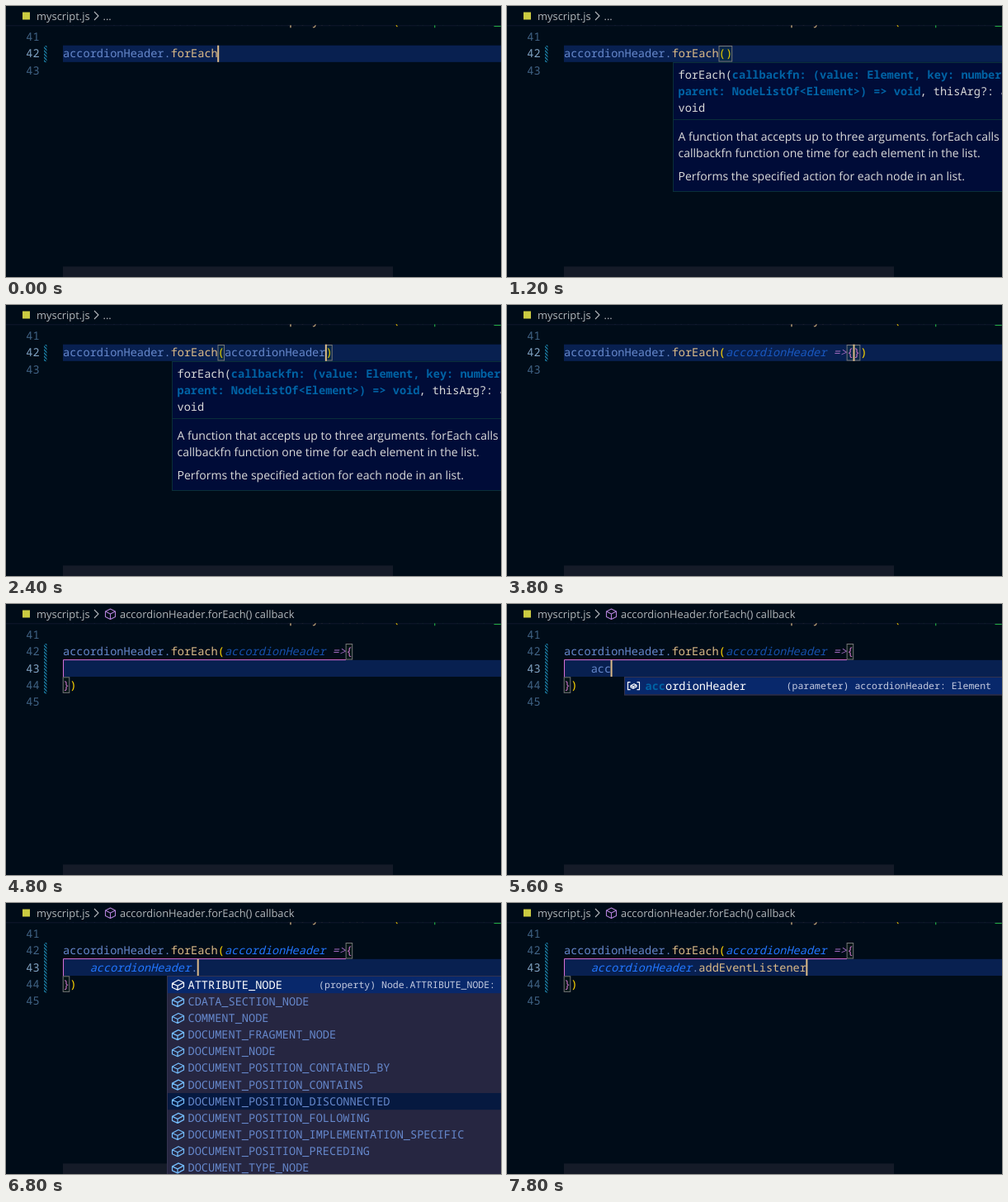
An HTML page that plays this animation: 600x328 px, repeating every 8000 ms.

```html
<!DOCTYPE html>
<html lang="en">
<head>
<meta charset="utf-8">
<title>Typing in a code editor</title>
<style>
  html, body { margin: 0; height: 100%; overflow: hidden; background: #000c18; }
  svg { display: block; width: 100vw; height: 100vh; }
  text { font: 13.61px "Noto Sans Mono", monospace; white-space: pre; text-rendering: geometricPrecision; }
  .ui { font: 12.9px "Open Sans", sans-serif; }
  .doc { font: 14.02px "Open Sans", sans-serif; }
  .detail { font-size: 11.5px; }
  .bold { font-weight: 700; }
  .italic { font-style: italic; }
  .unused { font-style: italic; opacity: .64; }
</style>
</head>
<body>
<svg id="stage" viewBox="0 0 600 328"></svg>
<script>
const LOOP = 8000, LEFT = 69, CHAR = 8.165, LINE = 20.15;
const color = {
  plain: '#6688cc', call: '#ddbb88', param: '#2277ff', arrow: '#9966b8',
  gold: '#ffd700', orchid: '#da70d6', dim: '#406385', active: '#80a2c2',
  light: '#dadada', crumb: '#b2b6ba', match: '#0063a5', field: '#75beff', method: '#b180d7'
};
const NAME = 'accordionHeader';

const globals = [NAME, 'addEventListener', 'alert', 'AbortController', 'AbortSignal',
  'AnalyserNode', 'Animation', 'AnimationEffect', 'AnimationEvent', 'Array', 'ArrayBuffer', 'Attr'];
const nodeFields = ['ATTRIBUTE_NODE', 'CDATA_SECTION_NODE', 'COMMENT_NODE', 'DOCUMENT_FRAGMENT_NODE',
  'DOCUMENT_NODE', ...['CONTAINED_BY', 'CONTAINS', 'DISCONNECTED', 'FOLLOWING',
  'IMPLEMENTATION_SPECIFIC', 'PRECEDING'].map(s => 'DOCUMENT_POSITION_' + s), 'DOCUMENT_TYPE_NODE'];
const methods = ['addEventListener', 'after', 'animate', 'append', 'appendChild', 'attachShadow',
  'attributes', 'ariaReadOnly', 'ariaExpanded', 'ariaDisabled', 'ariaLabel', 'assignedSlot'];

const list = (x, rows, typed, kind, detail = '', hover = -1) => ({ x, rows, typed, kind, detail, hover });
const globalList = (typed, count) => list(196, globals.slice(0, count), typed, 'variable');
const paramList = typed => list(142, [NAME], typed, 'variable', '(parameter) accordionHeader: Element');
const methodList = (typed, count, x = 142) =>
  list(x, methods.slice(0, count), typed, 'method', '(method) Element.addEventListener');

// Each entry changes part of the editor state from its time on.
const events = [
  [0, { arg: null, arrow: '', brace: false, open: false, typed: '', used: false,
        inCallback: false, hint: false, list: null, cursor: true }],
  [600, { arg: '' }],
  [800, { hint: true }],
  [1200, { cursor: false }],
  [1400, { arg: 'a', cursor: true, list: globalList('a', 12) }],
  [1600, { arg: 'ac', list: globalList('ac', 6) }],
  [1800, { arg: 'acc', list: globalList('acc', 1) }],
  [2000, { arg: 'accor', list: globalList('accor', 1) }],
  [2200, { arg: NAME, list: null }],
  [2800, { arrow: ' ' }],
  [3000, { arrow: ' =' }],
  [3200, { arrow: ' =>' }],
  [3800, { brace: true, hint: false }],
  [4200, { open: true }],
  [4400, { inCallback: true }],
  [4800, { cursor: false }],
  [5200, { cursor: true, typed: 'a', list: globalList('a', 12) }],
  [5400, { typed: 'ac', list: globalList('ac', 6) }],
  [5600, { typed: 'acc', list: paramList('acc') }],
  [5800, { typed: 'acco', list: paramList('acco') }],
  [6000, { typed: 'accor', list: paramList('accor') }],
  [6200, { typed: NAME, used: true, list: null }],
  [6600, { typed: NAME + '.', list: list(195, nodeFields, '', 'field', '(property) Node.ATTRIBUTE_NODE:', 7) }],
  [7000, { typed: NAME + '.a', list: methodList('a', 12, 195) }],
  [7200, { typed: NAME + '.ad', list: methodList('ad', 10) }],
  [7400, { typed: NAME + '.add', list: methodList('add', 1) }],
  [7600, { typed: NAME + '.addE', list: methodList('addE', 1) }],
  [7800, { typed: NAME + '.addEventListener', list: null }]
];

const escape = s => s.replace(/&/g, '&amp;').replace(/</g, '&lt;');
const text = (x, y, s, fill, cls = '') =>
  `<text x="${x}" y="${y}" fill="${fill}" class="${cls}">${escape(s)}</text>`;
const rect = (x, y, w, h, fill, stroke = 'none') =>
  `<rect x="${x}" y="${y}" width="${w}" height="${h}" fill="${fill}" stroke="${stroke}"/>`;
const path = (d, stroke, x = 0, y = 0, width = 1.1) =>
  `<path d="${d}" transform="translate(${x} ${y})" fill="none" stroke="${stroke}" stroke-width="${width}" stroke-linejoin="round"/>`;

const colX = col => LEFT + col * CHAR;
const lineTop = n => 47.7 + (n - 42) * LINE;
const baseline = n => lineTop(n) + 14.7;
const code = (col, n, s, fill, cls) => text(colX(col), baseline(n), s, fill, cls);
const bracketBox = (col, n, span = 1) =>
  rect(colX(col) + .2, lineTop(n) + .8, span * CHAR - .6, LINE - 1.6, 'rgba(0,100,0,.1)', '#777');
const bracketPair = (col, n, endCol, endLine) => n === endLine && endCol === col + 1
  ? bracketBox(col, n, 2)
  : bracketBox(col, n) + bracketBox(endCol, endLine);

const icons = {
  method: 'M7 .5L13 3.5V10L7 13L1 10V3.5ZM1 3.5L7 6.5L13 3.5M7 6.5V13',
  field: 'M.5 5L8 1L14.5 4V9L7 13L.5 10ZM.5 5L7 8L14.5 4M7 8V13',
  variable: 'M3.5 2.5H.5V11.5H3.5M11.5 2.5H14.5V11.5H11.5M4 6.5L8 4.5L11 6V8L7 10L4 8.5ZM4 6.5L7 7.7L11 6M7 7.7V10'
};

function breadcrumb(inCallback) {
  const chevron = path('M0 0L5 5L0 10', color.crumb, 107, 7);
  const tail = inCallback
    ? path(icons.method, color.method, 119.5, 5.5) + text(138, 17, 'accordionHeader.forEach() callback', color.crumb, 'ui')
    : text(117.5, 17, '...', color.crumb, 'ui');
  return rect(0, 0, 600, 23.3, '#000c18') + rect(20, 7.5, 9, 9, '#cbcb41') +
    text(37, 17, 'myscript.js', color.crumb, 'ui') + chevron + tail;
}

function hintBox() {
  const border = '#0a2f3a', x = 207.5;
  return rect(201.5, 68.5, 420, 156, '#000c38', border) +
    text(x, 88, 'forEach(', color.light) +
    text(x + 8 * CHAR, 88, 'callbackfn: (value: Element, key: number,', color.match, 'bold') +
    text(x, 108, 'parent: NodeListOf<Element>) => void', color.match, 'bold') +
    text(x + 36 * CHAR - 1, 108, ', thisArg?: any):', color.light) +
    text(x, 128.2, 'void', color.light) +
    rect(202, 137, 398, 1, border) +
    text(x, 162.5, 'A function that accepts up to three arguments. forEach calls', color.light, 'doc') +
    text(x, 182.5, 'callbackfn function one time for each element in the list.', color.light, 'doc') +
    text(x, 211.3, 'Performs the specified action for each node in an list.', color.light, 'doc');
}

function suggestions({ x, rows, typed, kind, detail, hover }, top) {
  let out = rect(x + .5, top + .5, 610 - x, rows.length * LINE + 1.5, '#262641', '#33334f');
  rows.forEach((label, i) => {
    const y = top + 1 + i * LINE, selected = i === 0;
    const iconColor = selected ? '#fff' : color[kind] || color.field;
    const labelColor = selected ? '#fff' : color.plain;
    const match = label.toLowerCase().startsWith(typed.toLowerCase()) ? typed.length : Math.min(typed.length, 1);
    if (selected) out += rect(x + 1, y, 600 - x, LINE, '#08286b');
    if (i === hover) out += rect(x + 1, y, 600 - x, LINE, '#061940');
    out += path(icons[kind], iconColor, x + (kind === 'variable' ? 4 : 6), y + 3.2, 1.2) +
      text(x + 25.5, y + 14.6, label.slice(0, match), color.match, 'bold') +
      text(x + 25.5 + match * CHAR, y + 14.6, label.slice(match), labelColor);
    if (selected && detail) {
      const end = kind === 'variable' ? 587 : 593;
      out += text(end - detail.length * 6.9, y + 13.9, detail, '#c4cbe0', 'detail');
    }
  });
  return out;
}

function callLine(s) {
  let out = code(0, 42, NAME + '.', color.plain) + code(16, 42, 'forEach', color.call);
  if (s.arg === null) return out;
  const isParam = s.arrow.includes('=>');
  const arrowCol = 24 + s.arg.length, end = arrowCol + s.arrow.length;
  out += code(23, 42, '(', color.gold) +
    code(24, 42, s.arg, isParam ? color.param : color.plain, isParam ? (s.used ? 'italic' : 'unused') : '') +
    code(arrowCol, 42, s.arrow, isParam ? color.arrow : color.plain, 'italic');
  if (!s.brace) return out + code(end, 42, ')', color.gold) + bracketPair(23, 42, end, 42);
  const [closeCol, closeLine] = s.open ? [0, 44] : [end + 1, 42];
  out += code(end, 42, '{', color.orchid) + code(closeCol, closeLine, '}', color.orchid) +
    code(closeCol + 1, closeLine, ')', color.gold) + bracketPair(end, 42, closeCol, closeLine);
  if (s.open) out += path(`M${colX(end)} 67.6H69.5V88.3`, color.orchid, 0, 0, 1);
  return out;
}

function bodyLine({ typed }) {
  const [object, member] = typed.split('.');
  const done = object === NAME;
  let out = code(4, 43, object, done ? color.param : color.plain, done ? 'italic' : '');
  if (member !== undefined) out += code(4 + NAME.length, 43, '.', color.plain) +
    code(5 + NAME.length, 43, member, member.length > 4 ? color.call : color.plain);
  return out;
}

// The line above is scrolled under the breadcrumb, so only its descenders show.
function hiddenLine() {
  return code(0, 40.05, 'const accordionHeader = document.', color.plain) +
    code(33, 40.05, 'querySelectorAll', color.call) + code(49, 40.05, '(', color.gold) +
    code(50, 40.05, "'.tabpanel-box__", '#22aa44');
}

function cursorColumn(s) {
  if (s.open) return 4 + s.typed.length;
  return s.arg === null ? 23 : 24 + s.arg.length + s.arrow.length + (s.brace ? 1 : 0);
}

function draw(s) {
  const current = s.open ? 43 : 42, last = s.open ? 45 : 43;
  let out = `<defs><pattern id="hatch" width="4" height="4" patternUnits="userSpaceOnUse">
    <path d="M-1 -1L5 5M-1 3L1 5M3 -1L5 1" stroke="#1b81a8" stroke-width="1.3"/></pattern></defs>`;
  out += rect(0, 0, 600, 328, '#000c18') + rect(0, 23, 600, 1.3, '#10182c') +
    rect(LEFT, lineTop(current), 531, LINE, '#082050') + hiddenLine();
  for (let n = 41; n <= last; n++)
    out += text(24.3, baseline(n), String(n), n === current ? color.active : color.dim);
  out += rect(46, 48, 3.5, LINE * (s.open ? 3 : 1), 'url(#hatch)') +
    rect(LEFT, 315.3, 400, 13, '#151b28') + callLine(s);
  if (s.open) out += bodyLine(s);
  if (s.cursor) out += rect(colX(cursorColumn(s)) - .6, lineTop(current), 2, LINE, color.call);
  if (s.hint) out += hintBox();
  if (s.list) out += suggestions(s.list, lineTop(current + 1));
  return out + breadcrumb(s.inCallback);
}

const stage = document.getElementById('stage');
const start = performance.now();
let shown = -1;

function tick() {
  const time = (performance.now() - start) % LOOP;
  const past = events.filter(([at]) => at <= time);
  if (past.length !== shown) {
    shown = past.length;
    stage.innerHTML = draw(Object.assign({}, ...past.map(([, change]) => change)));
  }
  requestAnimationFrame(tick);
}
tick();
</script>
</body>
</html>
```
